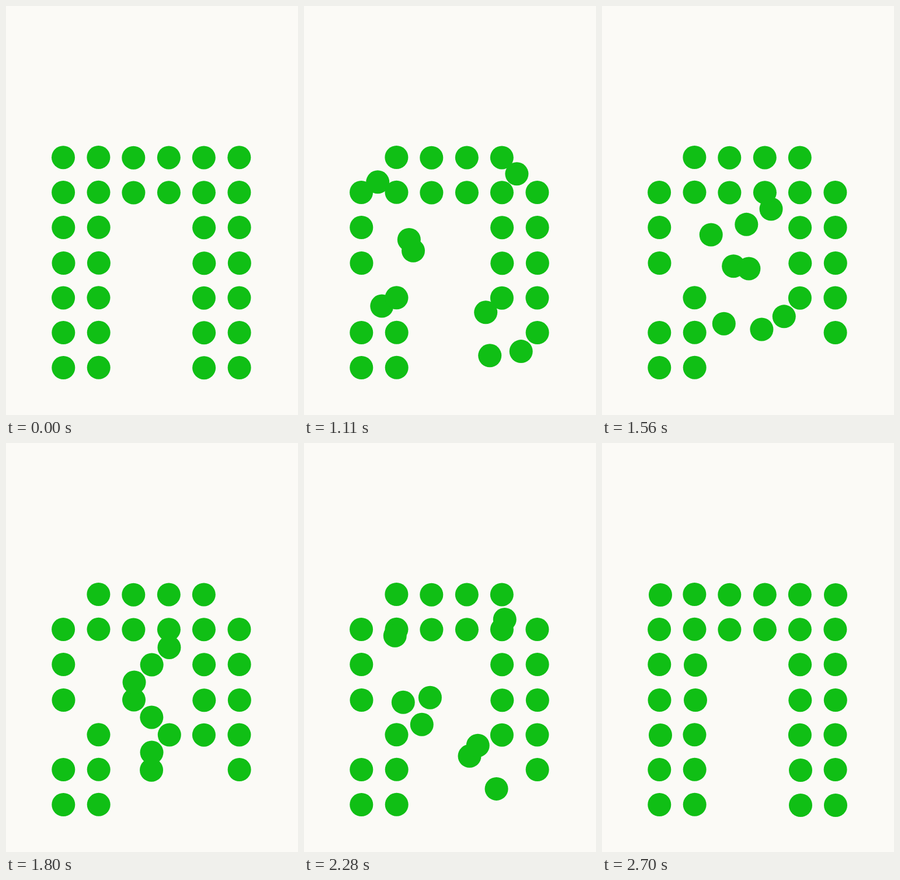
An HTML page with a canvas for the animation above (3600 ms loop, 500x700 px).

```html
<!DOCTYPE html>
<html lang="en">
<head>
<meta charset="utf-8">
<title>Dots changing places</title>
<style>
  html, body { margin: 0; height: 100%; overflow: hidden; background: #fbfaf6; }
  canvas { display: block; }
</style>
</head>
<body>
<canvas id="stage" width="500" height="700"></canvas>
<script>
const ctx = document.getElementById('stage').getContext('2d');
const LOOP = 3600, STEP = 30, START = 900, TRAVEL = 1800, RADIUS = 20;

// Slightly uneven grid: column and row positions plus small offsets
const colX = [98, 158.4, 218.3, 278.8, 338.8, 399.3];
const rowY = [259.2, 319, 379, 440, 499.5, 559, 619];
const rowDx = [0, .1, .3, .5, .1, .3, .3];
const colDy = [0, -.2, .5, .2, .2, 0];

// Travelling dots: "row,col" -> [row, col] of the even grid
const moves = {
  '0,0': [6, 4], '0,5': [4, 0], '2,1': [5, 4], '3,1': [0, 5],
  '4,0': [6, 5], '5,4': [0, 0], '6,4': [3, 1], '6,5': [2, 1]
};

const dots = [];
for (let row = 0; row < 7; row++) {
  for (let col = 0; col < 6; col++) {
    if (row > 1 && (col === 2 || col === 3)) continue;
    const x = colX[col] + rowDx[row], y = rowY[row] + colDy[col];
    const goal = moves[[row, col]];
    dots.push({
      x, y,
      dx: goal ? 100 + 60 * goal[1] - x : 0,
      dy: goal ? 260 + 60 * goal[0] - y : 0
    });
  }
}

function draw(time) {
  const t = Math.floor((time % LOOP) / STEP) * STEP;
  const p = Math.min(1, Math.max(0, (t - START) / TRAVEL));
  ctx.fillStyle = '#fbfaf6';
  ctx.fillRect(0, 0, 500, 700);
  ctx.fillStyle = '#10bf15';
  for (const d of dots) {
    ctx.beginPath();
    ctx.arc(d.x + d.dx * p, d.y + d.dy * p, RADIUS, 0, 2 * Math.PI);
    ctx.fill();
  }
}

function tick() {
  draw(performance.now());
  requestAnimationFrame(tick);
}
tick();
</script>
</body>
</html>
```
